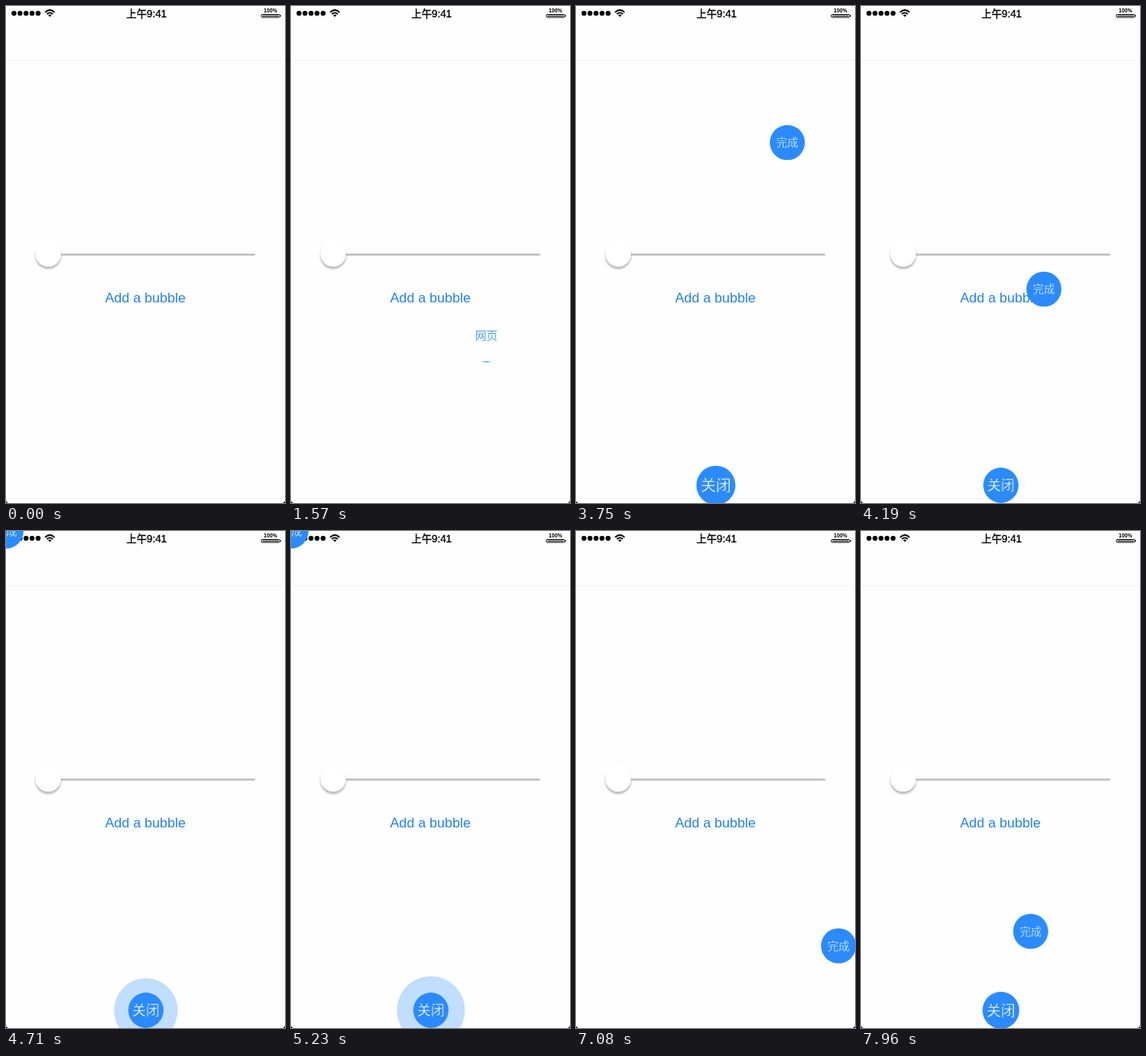
These frames come from a looping animation (347 px wide and 617 px high, 8 s). An HTML page:

```html
<!DOCTYPE html>
<html lang="zh">
<head>
<meta charset="utf-8">
<title>Bubble</title>
<style>
html, body { margin: 0; width: 100%; height: 100%; overflow: hidden; background: #fefefe; }
svg { display: block; width: 347px; height: 617px; }
text { text-anchor: middle; font-family: "Liberation Sans", "Noto Sans CJK SC", "Noto Sans CJK", sans-serif; }
.label { font-family: "Noto Sans CJK SC", "Noto Sans CJK", sans-serif; font-weight: 300; }
.disc { fill: #2b8bfe; }
.disc + .label { fill: #fff; stroke: #2b8bfe; stroke-width: .3; }
</style>
</head>
<body>
<svg viewBox="0 0 347 617">
  <defs>
    <filter id="soft" x="-30%" y="-30%" width="160%" height="160%"><feGaussianBlur stdDeviation="1.2"/></filter>
  </defs>
  <rect width="347" height="617" fill="#fefefe"/>
  <rect y="67" width="347" height="1" fill="#f1f1f1"/>

  <g id="dots"></g>
  <g fill="none" stroke="#000" stroke-width="1.7">
    <path d="M48.6 7.8Q54.5 2.2 60.4 7.8M50.8 10Q54.5 6.6 58.2 10"/>
    <path d="M52.4 11.4Q54.5 9.6 56.6 11.4L54.5 13.6Z" fill="#000" stroke="none"/>
  </g>
  <text x="174.8" y="13.6" font-size="12.7" stroke="#000" stroke-width=".35">上午9:41</text>
  <text x="329" y="7.8" font-size="6.6" font-weight="700">100%</text>
  <rect x="317.5" y="10.5" width="23" height="3.6" rx="1.4" fill="#fff" stroke="#000"/>
  <rect x="319" y="11.8" width="20" height="1" fill="#000"/>
  <rect x="341" y="11.5" width="1" height="1.6" fill="#000"/>

  <rect x="52" y="307.4" width="258" height="2.4" rx="1.2" fill="#b8b8b8"/>
  <circle cx="52.5" cy="310.2" r="16.2" fill="#000" opacity=".27" filter="url(#soft)"/>
  <circle cx="52.5" cy="307.6" r="16" fill="#fff"/>

  <text id="button" x="173.3" y="368.4" font-size="17" fill="#2180ea">Add a bubble</text>

  <g id="birth">
    <text class="label" x="243" y="414.4" font-size="14" fill="#4a9df8">网页</text>
    <path d="M237 441.2H249Q243 443.6 237 441.2Z" fill="#3c95fb"/>
  </g>
  <circle id="halo" cx="174" cy="595" fill="#c1ddff"/>
  <g id="close">
    <circle class="disc" r="21.9"/>
    <text class="label" y="6.3" font-size="17">关闭</text>
  </g>
  <g id="bubble">
    <circle class="disc" r="21.8"/>
    <text class="label" y="4.6" font-size="13.8">完成</text>
  </g>
  <path d="M0 613.5Q.3 616.7 3.5 617H0ZM347 613.5Q346.7 616.7 343.5 617H347Z" fill="#000"/>
</svg>
<script>
const el = id => document.getElementById(id);
const LOOP = 8000, STEP = 87.4, BIRTH = 1570;

// ticks at which the gestures begin
const GRAB = 21, CIRCLE = 33, TURN = 42, LEAVE = 51, RELEASE = 54, REGRAB = 68;

const START = [243, 420], TOP = [326.5, 129], LOW = [326.5, 515];
const PAUSE = [233, 544.5], DROP = [241, 524], END = [211, 497];

el('dots').innerHTML = [0, 1, 2, 3, 4]
  .map(i => `<circle cx="${9.9 + i * 7.5}" cy="9" r="3.1"/>`).join('');

const clamp = v => Math.max(0, Math.min(1, v));
const mix = (a, b, u) => a.map((v, i) => v + (b[i] - v) * u);

// step response of a damped spring, counted in ticks
function spring(ticks, decay, freq) {
  const s = Math.max(0, ticks) * STEP / 1000, a = freq * s;
  return 1 - Math.exp(-decay * s) * (Math.cos(a) + decay / freq * Math.sin(a));
}

function dragDown(k) {
  const u = (k - GRAB) / 9;
  return [TOP[0] - 99 * Math.sin(u * Math.PI / 2), TOP[1] + 222.5 * u ** 2.1];
}

// one turn round the close button, then a swing back and forth
function circleClose(k) {
  const n = k - TOP;
  const deg = -59.5 + (n < 0 ? 40 * n : -130 * Math.sin(Math.PI * n / 9));
  const a = deg * Math.PI / 180;
  return [200 + 65 * Math.cos(a), 560 + 18 * Math.sin(a)];
}

function dragUp(k) {
  const u = (k - REGRAB) / 5, [x, y] = mix(LOW, END, u);
  return [x, y - 140 * u * (1 - u)];
}

function bubbleAt(k) {
  if (k < GRAB) return mix(START, TOP, spring(k, 7.3, 11.4));
  if (k < CIRCLE) return dragDown(k);
  if (k < LEAVE) return circleClose(k);
  if (k < RELEASE) return mix(PAUSE, DROP, (k - LEAVE) / 3);
  if (k < REGRAB) return mix(DROP, LOW, spring(k - RELEASE, 9, 11));
  return dragUp(k);
}

function closeScale(k) {
  const again = k > REGRAB;
  const out = again ? 0 : clamp((k - RELEASE - 1) / 4);
  return spring(k - (again ? REGRAB : GRAB) - 1, 8.8, 12.6) * (1 - out * out);
}

function haloRadius(k) {
  const grow = 1 - (1 - clamp((k - CIRCLE) / 4)) ** 2;
  return 42.3 * grow * (1 - clamp((k - RELEASE - 1) / 3));
}

const show = (id, on) => el(id).setAttribute('visibility', on ? 'visible' : 'hidden');

function draw(t) {
  const k = Math.floor((t - BIRTH + 25) / STEP);
  const press = k + 12;
  el('button').setAttribute('opacity', press < 0 ? 1 : clamp(0.25 + press * 0.1875));

  show('birth', k === 0);
  show('bubble', k > 0);
  if (k > 0) el('bubble').setAttribute('transform', `translate(${bubbleAt(k)})`);

  const s = closeScale(k);
  show('close', s > 0.001);
  el('close').setAttribute('transform', `translate(174 595) scale(${s})`);
  el('halo').setAttribute('r', haloRadius(k));
}

let start;
function tick(now) {
  start ??= now;
  draw((now - start) % LOOP);
  requestAnimationFrame(tick);
}
draw(0);
requestAnimationFrame(tick);
</script>
</body>
</html>
```
